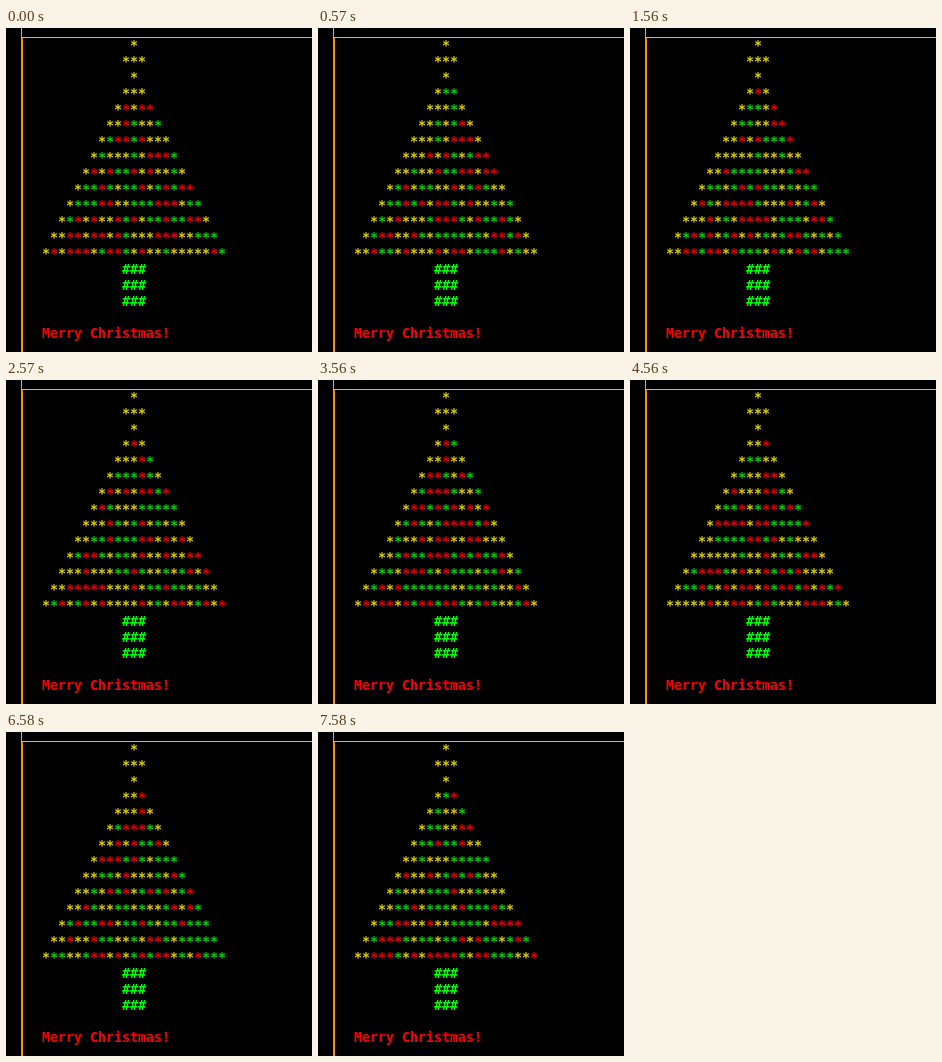
These frames come from a looping animation (306 by 324 pixels, 8 s). An HTML page with a canvas:

```html
<!DOCTYPE html>
<html lang="en">
<head>
<meta charset="utf-8">
<title>Terminal Christmas tree</title>
<style>
  html, body { margin: 0; width: 100%; height: 100%; overflow: hidden; background: #000; }
  canvas { display: block; }
</style>
</head>
<body>
<canvas id="stage" width="306" height="324"></canvas>
<script>
const ctx = document.getElementById('stage').getContext('2d');
const LOOP = 8000;
const TICKS = [0, 570, 1560, 2570, 3560, 4560, 5560, 6580, 7580];
const CELL = 8, LINE = 16, MIDDLE = 128, BASELINE = 22;
const YELLOW = '#dcd200', RED = '#e60000', GREEN = '#00d800';

// Mulberry32
function randomFrom(seed) {
  return () => {
    seed = (seed + 0x6D2B79F5) | 0;
    let t = Math.imul(seed ^ (seed >>> 15), 1 | seed);
    t = (t + Math.imul(t ^ (t >>> 7), 61 | t)) ^ t;
    return ((t ^ (t >>> 14)) >>> 0) / 4294967296;
  };
}

function glyph(char, x, row, color) {
  ctx.fillStyle = color;
  ctx.fillText(char, x, BASELINE + row * LINE);
}

// Centred row; colorAt(i) gives the colour of the i-th star
function stars(row, count, colorAt) {
  const left = MIDDLE - (count - 1) / 2 * CELL;
  for (let i = 0; i < count; i++) glyph('*', left + i * CELL, row, colorAt(i));
}

function windowEdge() {
  ctx.fillStyle = '#b9b5a8';
  ctx.fillRect(15, 0, 1, 10);
  ctx.fillRect(15, 9, 291, 1);
  ctx.fillStyle = '#ff8c14';
  ctx.fillRect(15, 10, 2, 314);
}

function draw(step) {
  const random = randomFrom(2412 + step * 97);
  const light = () => {
    const r = random();
    return r < 0.36 ? YELLOW : r < 0.68 ? RED : GREEN;
  };
  ctx.fillStyle = '#000';
  ctx.fillRect(0, 0, 306, 324);
  windowEdge();
  ctx.font = 'bold 13.333px "DejaVu Sans Mono", monospace';
  ctx.textAlign = 'center';

  [1, 3, 1].forEach((count, row) => stars(row, count, () => YELLOW));
  for (let row = 3; row < 14; row++) {
    stars(row, row * 2 - 3, i => i ? light() : YELLOW);
  }
  for (let row = 14; row < 17; row++) {
    for (let i = -1; i < 2; i++) glyph('#', MIDDLE + i * CELL, row, '#00ff00');
  }
  [...'Merry Christmas!'].forEach((char, i) => glyph(char, 40 + i * CELL, 18, '#ff0000'));
}

let shown = -1;
function frame(now) {
  const time = now % LOOP;
  const step = TICKS.filter(t => t <= time).length - 1;
  if (step !== shown) draw(shown = step);
  requestAnimationFrame(frame);
}
draw(0);
requestAnimationFrame(frame);
</script>
</body>
</html>
```
